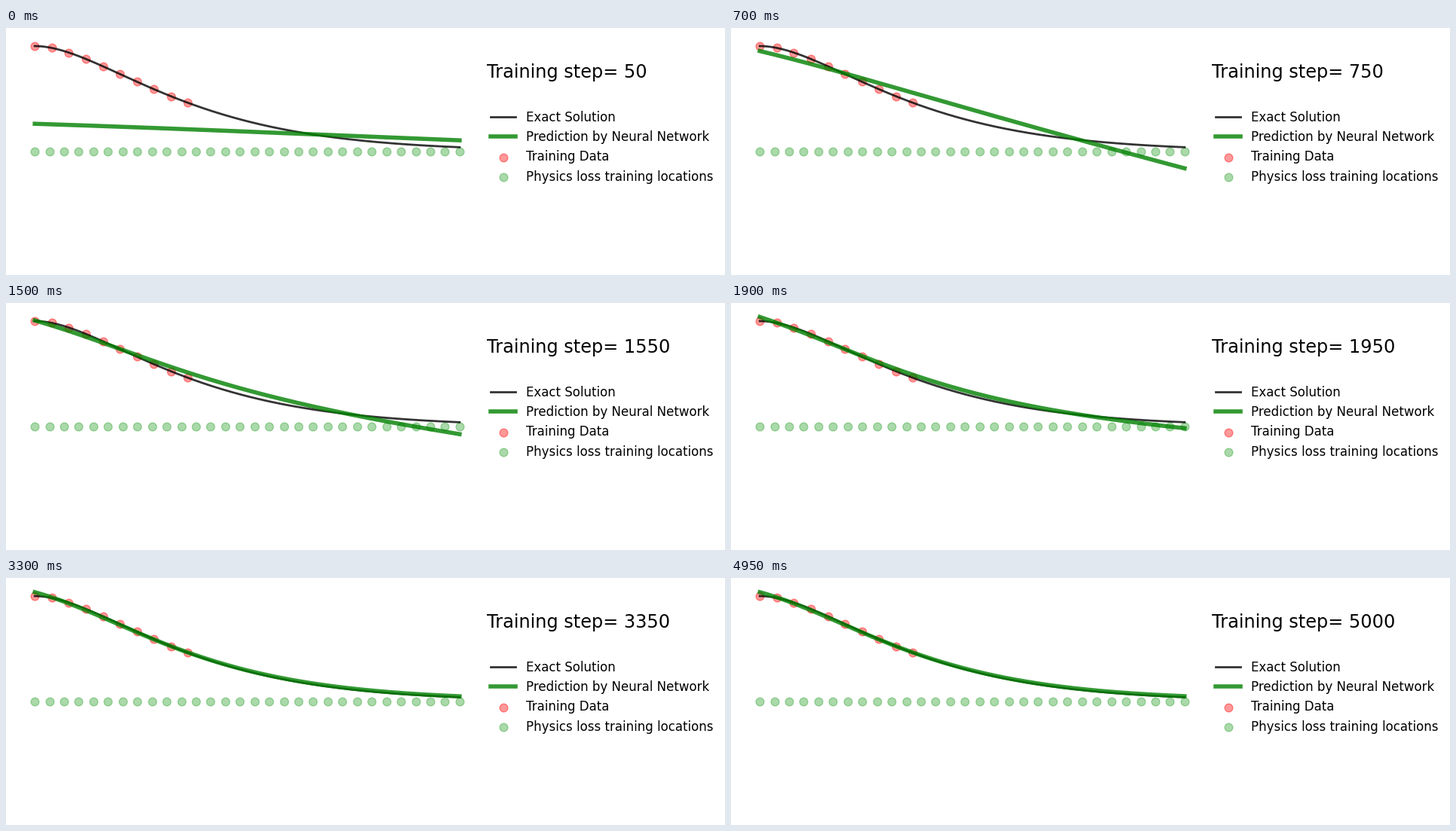
Write a matplotlib script that moves like this. It is 954 px wide and 328 px high and loops after 5000 ms.

```python
import numpy as np
import matplotlib.pyplot as plt
from matplotlib.animation import FuncAnimation

W, H, DPI = 954, 328, 100
FRAMES, INTERVAL, STEP = 100, 50, 50
EPS = 1e-6  # keeps the pixel size from rounding down

plt.rcParams["font.family"] = "DejaVu Sans"


def exact(x):
    """Critically damped oscillator starting at rest."""
    return (1 + 5 * x) * np.exp(-5 * x)


def early_fit(x, step):
    """Slightly bowed line that first settles on the training data."""
    start = 0.95 - 0.687 * np.exp(-(step - 50) / 154)
    slope = 1.16 / (1 + np.exp(-(step - 290.6) / 129.7))
    bow = 0.13 * slope * x * (1 - x) * (1.3 - x)
    return start - slope * x + bow


def late_fit(x, step):
    """Nearly exact curve whose left end overshoots for a while."""
    residue = 0.01 + 0.027 * (1 - 31 * x) * np.exp(-10 * x)
    overshoot = 0.033 * np.exp(-((step - 2000) / 600) ** 2 - 12 * x)
    return exact(x) + residue + overshoot


def predict(x, step):
    early = np.exp(-(step / 1730) ** 2.6)
    return early * early_fit(x, step) + (1 - early) * late_fit(x, step)


x = np.linspace(0, 1, 500)
x_data = x[0:200:20]
x_physics = np.linspace(0, 1, 30)

fig = plt.figure(figsize=(W / DPI + EPS, H / DPI + EPS), dpi=DPI, facecolor="white")
ax = fig.add_axes([10 / W, 10 / H, 620 / W, 308 / H])
ax.set_xlim(-0.05, 1.05)
ax.set_ylim(-1.1, 1.1)
ax.axis("off")

ax.plot(x, exact(x), color="black", linewidth=2, alpha=0.8, label="Exact Solution")
prediction, = ax.plot(x, predict(x, STEP), color="green", linewidth=4, alpha=0.8,
                      label="Prediction by Neural Network")
ax.scatter(x_data, exact(x_data), s=60, color="red", alpha=0.4, label="Training Data")
ax.scatter(x_physics, 0 * x_physics, s=60, color="tab:green", alpha=0.4,
           label="Physics loss training locations")
ax.legend(loc=(1.01, 0.34), frameon=False, fontsize="large")
title = ax.text(1.065, 0.7, "", fontsize="xx-large", color="black")


def update(frame):
    step = STEP * (frame + 1)
    prediction.set_ydata(predict(x, step))
    title.set_text(f"Training step= {step}")
    return prediction, title


anim = FuncAnimation(fig, update, frames=FRAMES, interval=INTERVAL,
                     init_func=lambda: update(0), repeat=True)
plt.show()
```
